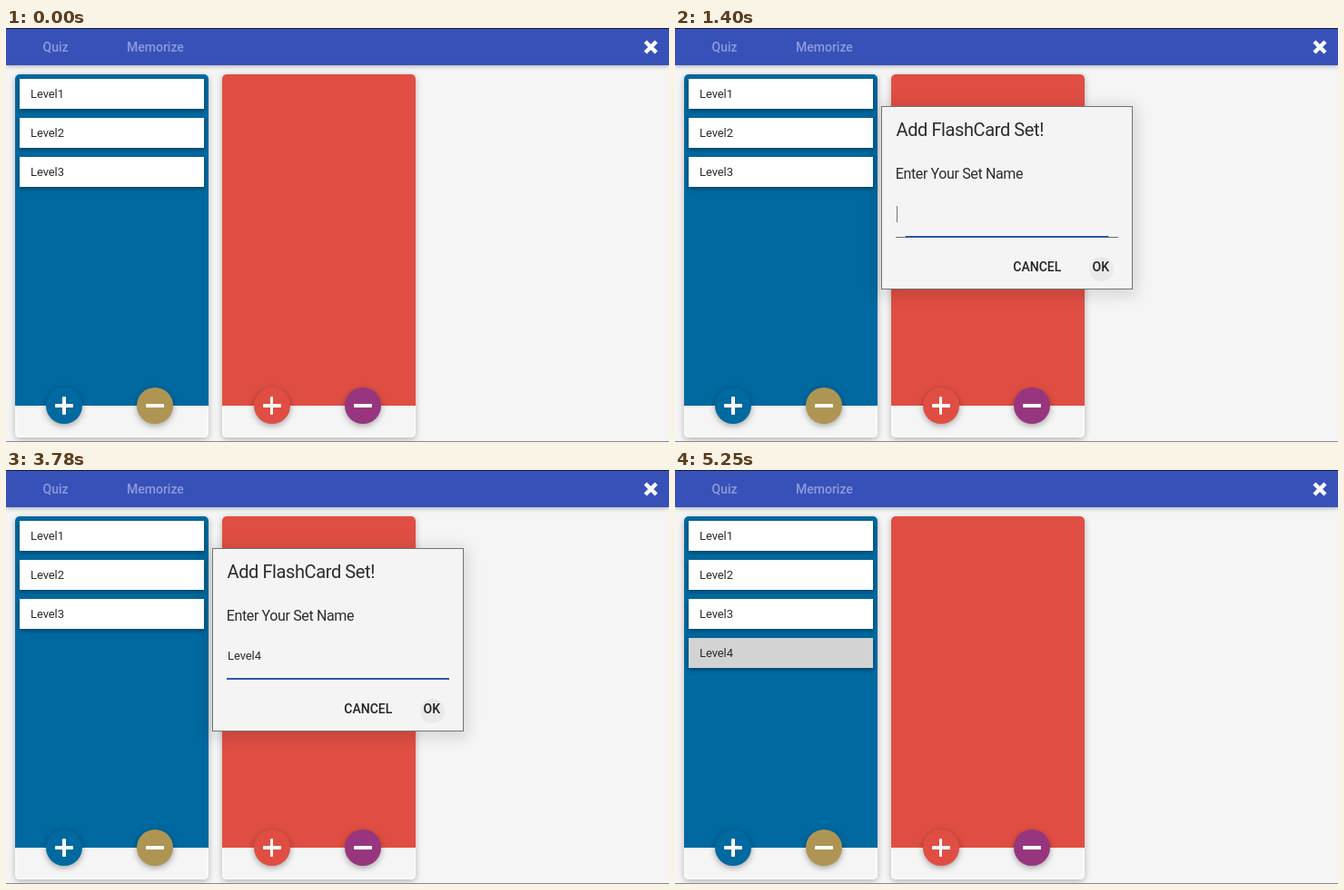
An HTML page that plays this animation: 730 px wide and 456 px high, repeating every 5.32 s.

```html
<!DOCTYPE html>
<html lang="en">
<head>
<meta charset="utf-8">
<title>Flash card sets</title>
<style>
  html, body { margin: 0; width: 100%; height: 100%; overflow: hidden; }
  body { font: 13px Roboto, sans-serif; background: #f5f5f5; }
  .stage { position: relative; width: 730px; height: 456px; overflow: hidden; background: #f5f5f5; }
  .stage * { position: absolute; box-sizing: border-box; white-space: nowrap; }

  .bar {
    left: 0; top: 0; width: 730px; height: 41px;
    background: #3851b9; border-top: 1px solid #141c38;
    box-shadow: 0 1px 5px rgba(0, 0, 0, .32);
    font-weight: 500; font-size: 14px; line-height: 40px; color: #8c9ada;
  }
  .bar span { top: 0; }
  .close { left: 700px; top: 10px; width: 20px; height: 20px; stroke: #fff; stroke-width: 4.4; }
  .edge { left: 0; top: 455px; width: 730px; height: 1px; background: #85898f; }

  .column {
    top: 51px; width: 213px; height: 400px; border-radius: 5px;
    background: #f5f5f5;
    box-shadow: 0 2px 7px rgba(0, 0, 0, .28), inset 0 0 0 2px #fafafa;
  }
  .fill { left: 0; top: 0; width: 100%; height: 365px; border-radius: 5px 5px 0 0; background: var(--c); }
  .item {
    left: 5px; width: 203px; height: 33px; padding-left: 12px;
    line-height: 33px; letter-spacing: -.08px; color: #2b2b2b; background: #fff;
    box-shadow: 0 2px 5px rgba(0, 0, 0, .38);
  }
  .fresh { background: #d3d3d3; animation: fresh 5320ms step-end infinite; }

  .fab {
    top: 345px; width: 40px; height: 40px; border-radius: 50%;
    background: var(--c); box-shadow: 0 2px 7px rgba(0, 0, 0, .34);
  }
  .fab::before, .plus::after {
    content: ""; position: absolute; left: 10px; top: 18px;
    width: 20px; height: 4px; border-radius: 1px; background: #fff;
  }
  .plus::before { top: 18.2px; height: 3.6px; }
  .plus::after { left: 18.2px; top: 10px; width: 3.6px; height: 20px; }

  .dialog {
    left: 227px; top: 86px; width: 277px; height: 202px;
    background: #f4f4f4; border: 1px solid #747474;
    box-shadow: 0 3px 16px 4px rgba(0, 0, 0, .13);
    color: #2c2c2c; animation: dialog 5320ms step-end infinite;
  }
  .title { left: 15.5px; top: 13px; font-size: 20px; line-height: 24px; letter-spacing: -.4px; }
  .label { left: 14.7px; top: 64px; font-size: 16px; line-height: 20px; letter-spacing: -.36px; }
  .button { top: 166px; font-weight: 500; font-size: 14px; line-height: 20px; color: #222; }
  .halo { left: 228px; top: 165px; width: 27px; height: 27px; border-radius: 50%; background: #eaeaea; }
  .rule { left: 15px; top: 143px; width: 245px; height: 1px; background: #6c6c6c; }
  .focus {
    left: 15px; top: 142px; width: 245px; height: 2px; background: #2c58a6;
    animation: focus 5320ms linear infinite;
  }
  .typed {
    left: 16px; top: 109px; height: 18px; box-sizing: content-box !important; overflow: hidden;
    line-height: 18px; letter-spacing: -.08px;
    border-right: 1px solid #747474;
    animation: type 5320ms step-end infinite, blink 5320ms step-end infinite;
  }

  @keyframes fresh {
    0% { visibility: hidden; }
    78.94%, 100% { visibility: visible; }
  }
  @keyframes dialog {
    0% { visibility: hidden; }
    21.05% { visibility: visible; }
    78.94%, 100% { visibility: hidden; }
  }
  @keyframes focus {
    0%, 19.55% { transform: scaleX(0); animation-timing-function: ease; }
    30.08%, 100% { transform: scaleX(1); }
  }
  @keyframes type {
    0% { width: 0; }
    38.15% { width: 7px; }
    40.78% { width: 13px; }
    47.36% { width: 20px; }
    53.94% { width: 26px; }
    56.57% { width: 29px; }
    60.52%, 100% { width: 37px; }
  }
  @keyframes blink {
    0% { border-color: #747474; }
    31.57% { border-color: transparent; }
    34.21% { border-color: #747474; }
    71.05%, 100% { border-color: transparent; }
  }
</style>
</head>
<body>
<div class="stage">
  <div class="column" style="left:10px">
    <div class="fill" style="--c:#0069a0">
      <div class="item" style="top:5px">Level1</div>
      <div class="item" style="top:48px">Level2</div>
      <div class="item" style="top:91px">Level3</div>
      <div class="item fresh" style="top:134px">Level4</div>
    </div>
    <div class="fab plus" style="left:34px;--c:#0069a0"></div>
    <div class="fab" style="left:134px;--c:#af9554"></div>
  </div>

  <div class="column" style="left:238px">
    <div class="fill" style="--c:#e04e43"></div>
    <div class="fab plus" style="left:34.5px;--c:#e04e43"></div>
    <div class="fab" style="left:134.5px;--c:#97367f"></div>
  </div>

  <div class="bar">
    <span style="left:40.5px">Quiz</span>
    <span style="left:133px">Memorize</span>
    <svg class="close" viewBox="0 0 20 20"><path d="M4 4L16 16M16 4L4 16"/></svg>
  </div>
  <div class="edge"></div>

  <div class="dialog">
    <div class="title">Add FlashCard Set!</div>
    <div class="label">Enter Your Set Name</div>
    <div class="typed">Level4</div>
    <div class="rule"></div>
    <div class="focus"></div>
    <div class="halo"></div>
    <div class="button" style="left:144.3px">CANCEL</div>
    <div class="button" style="left:231.5px">OK</div>
  </div>
</div>
</body>
</html>
```
